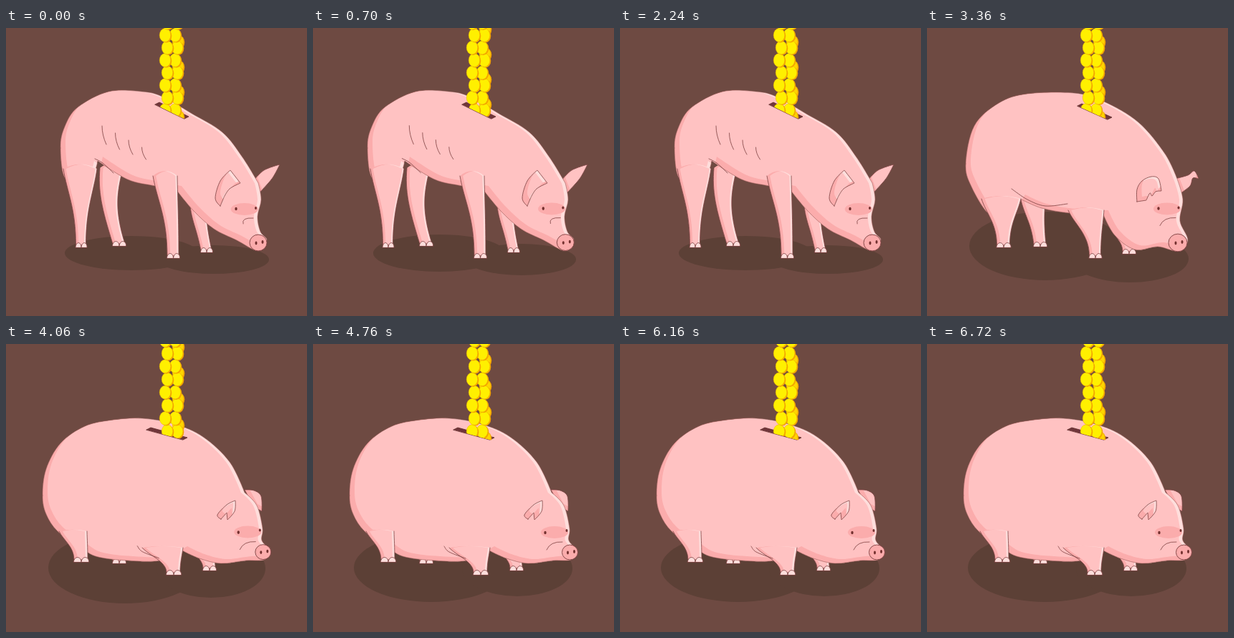
An HTML page for the animation above (6.86 s loop, 420 by 403 pixels).

```html
<!DOCTYPE html>
<html lang="en">
<head>
<meta charset="utf-8">
<title>Piggy bank</title>
<style>
html, body { margin: 0; width: 100%; height: 100%; overflow: hidden; background: #6e4a42; }
svg { display: block; width: 100vw; height: 100vh; }
</style>
</head>
<body>
<svg id="stage" viewBox="0 0 420 403"></svg>
<script>
const STEP = 140, COUNT = 49;
const PINK = '#ffc2c2', DARK = '#fbacac', PALE = '#ffdedc', INK = '#7b4040', EYE = '#73302f', SHADOW = '#5c4036';

// Points are "x,y"; a trailing "!" makes a sharp corner.
// Legs: left and right at the top, top y, foot x, floor y, half width, knee bend.
const poses = [
  {
    until: 17, fullness: 0,
    shadow: [[175, 315, 93, 24], [290, 324, 77, 20]],
    torso: '76,168 82,138 100,111 143,89 190,89 218,96 258,119 302,146 330,181 352,217! 356,240 351,264 355,285 364,297 352,312 322,297 290,281 262,256 238,227! 208,221 170,212 128,186! 118,208 84,212',
    far: [[131, 163, 196, 158, 305, 9, -16], [257, 280, 248, 280, 314, 8, -6]],
    near: [[80, 127, 197, 105, 307, 7.5, 0], [205, 239, 207, 233.5, 322, 8.5, 0]],
    earBack: '346,213! 360,199 382,191! 371,211 353,231!',
    ear: '299,249! 292,238 299,214 313,199! 327,217! 312,225 304,237!',
    fold: '124,183 135,189 150,203',
    eyes: [321, 253, 348.5, 252], nose: [352, 300.5, 12],
    slot: [208, 107, 249, 127], coins: [10, 17.5]
  },
  {
    until: 25, fullness: 1,
    shadow: [[165, 305, 106, 48], [283, 323, 82, 33]],
    torso: '54,190 66,137 100,105 140,92 205,91 247,103 295,132 332,176 349,211! 357,240 353,270 364,297 350,312 322,306 290,310 262,290 246,261! 200,259 160,252 130,239! 110,264 86,260 62,222',
    far: [[131, 165, 240, 158, 306, 9, -3], [258, 285, 283, 282, 316, 9, 0]],
    near: [[76, 131, 239, 107, 307, 9.5, 0], [197, 247, 255, 235, 322, 8.5, 0]],
    earBack: '346,211! 364,206 373,200 379,211! 371,210 367,221 354,231!',
    ear: '293,243! 293,226 300,214 313,208 323,211 327,228! 319,229 314,235 311,231 306,241!',
    fold: '118,225 140,240 165,249 196,246',
    eyes: [323, 252.5, 351, 251.5], nose: [350, 300.5, 13],
    slot: [210, 109, 252, 128], coins: [10, 17.5]
  },
  {
    until: COUNT, fullness: 1,
    shadow: [[165, 313, 108, 48], [285, 314, 77, 39]],
    torso: '51,212 56,175 76,139 110,115 150,106 190,104 235,112 275,130 312,165 333,208! 350,226 358,258 357,275 369,290 360,302 335,303 300,307 270,300 246,289! 215,303 170,303 125,297 100,281 72,262 56,238',
    far: [[148, 167, 294, 158, 307, 9, 0], [262, 290, 290, 284, 317, 9, 0]],
    near: [[74, 113, 262, 105, 305, 10, 0], [190, 247, 285, 234, 323, 10, 0]],
    earBack: '332,204! 345,205 355,213 356,234! 345,228!',
    ear: '300,245! 295,239 308,225 320,219! 319,234 309,246! 308,236!',
    fold: '183,283 190,291 213,300',
    eyes: [324, 264, 354, 261], nose: [358.5, 291.5, 11],
    slot: [196, 120, 247, 134], coins: [13, 18.2]
  }
];

// Smooth path through the points.
function curve(text, closed = true) {
  const p = text.split(' ').map(s => ({ sharp: s.endsWith('!'), v: s.replace('!', '').split(',').map(Number) }));
  const n = p.length;
  const at = i => p[closed ? (i + n) % n : Math.max(0, Math.min(n - 1, i))];
  const slope = (i, k) => at(i).sharp ? 0 : (at(i + 1).v[k] - at(i - 1).v[k]) / 6;
  let d = 'M' + p[0].v;
  for (let i = 0; i < n - (closed ? 0 : 1); i++) {
    const a = at(i).v, b = at(i + 1).v;
    d += `C${a.map((v, k) => v + slope(i, k))} ${b.map((v, k) => v - slope(i + 1, k))} ${b}`;
  }
  return d + (closed ? 'Z' : '');
}

const path = (d, fill, ink = 'none', w = 0.8) =>
  `<path d="${d}" fill="${fill}" stroke="${ink}" stroke-width="${w}" stroke-linecap="round"/>`;
const oval = (x, y, rx, ry, fill, extra = '') =>
  `<ellipse cx="${x}" cy="${y}" rx="${rx}" ry="${ry}" fill="${fill}" ${extra}/>`;

// A pink shape, dark on its lower left and pale on its right.
let clips = 0;
function solid(d, dark, pale) {
  const id = 'clip' + clips++;
  const rim = ([x, y], fill) =>
    `<path d="${d}M-99-99H600V600H-99Z" fill="${fill}" fill-rule="evenodd" transform="translate(${x} ${y})"/>`;
  return `<clipPath id="${id}"><path d="${d}"/></clipPath>
    <g clip-path="url(#${id})">${path(d, PINK)}${rim(pale, PALE)}${rim(dark, DARK)}</g>`;
}

function hoof(x, floor, w) {
  return [-w, 0].map(dx => path(
    `M${x + dx} ${floor}q${w * .1} -6.5 ${w * .55} -6.5q${w * .45} 1 ${w * .45} 6.5Z`, PALE, INK)).join('');
}

function leg([x1, x2, y, foot, floor, w, bend]) {
  const h = floor - y, end = floor - 3;
  const knee = (top, ankle) => [
    `${top + (ankle - top) * .3 + bend / 2} ${y + h * .3}`, `${ankle + bend} ${y + h * .5}`];
  const [a, b] = knee(x1, foot - w), [c, d] = knee(x2, foot + w - 1);
  const sides = `M${x1} ${y}C${a} ${b} ${foot - w} ${end}H${foot + w - 1}C${d} ${c} ${x2} ${y}`;
  const top = `Q${(x1 + x2) / 2} ${y - h * .12} ${x1} ${y}Z`;
  return solid(sides + top, [w * .5, 0], [-w * .3, 0]) + path(sides, 'none', INK) + hoof(foot, floor, w * 1.08);
}

function face({ eyes: [x1, y1, x2, y2], nose: [nx, ny, r], fullness }) {
  return oval((x1 + x2) / 2 - 2, (y1 + y2) / 2 + 1, 19, 8.5, DARK)
    + oval(x1, y1, 1.7, 2.3, EYE) + oval(x2, y2, 1.5, 2, EYE)
    + path(`M${x1 + 10 - 8 * fullness} ${y1 + 21 + 3 * fullness}Q${x1 + 7} ${y1 + 12} ${x1 + 24} ${y1 + 13}`, 'none', INK)
    + oval(nx, ny, r, r * .95, DARK, `stroke="${INK}" stroke-width=".9"`)
    + [-3, 6].map(dx => oval(nx + dx, ny - dx / 6, 1.5, 2.4, EYE)).join('');
}

function ribs() {
  let out = '';
  for (let i = 0; i < 4; i++) {
    const len = 26 - 3 * i;
    out += path(`M${134 + 18.5 * i} ${137 + 10 * i}q0 ${len / 2} 6 ${len}`, 'none', INK);
  }
  return out;
}

function coin(x, y, fill) {
  return oval(x + 1.5, y + 1, 7.8, 9.5, '#f5a300')
    + oval(x, y, 7.8, 9.4, fill, 'stroke="#eab000" stroke-width=".5"');
}

function coinStack([top, gap], odd) {
  let back = '', front = '';
  for (let k = 8; k >= -2; k--) {
    const y = top + k * gap, side = (k + odd) & 1;
    if (!side) back += coin(240, y + 9, '#ffd500');
    for (const x of [236, 222]) front += coin(x + 3 * side, y, '#fff000');
  }
  return back + front;
}

function slot([x1, y1, x2, y2], stack) {
  const id = 'clip' + clips++;
  const end = y2 + (280 - x2) * (y2 - y1) / (x2 - x1);
  return path(`M${x1} ${y1}l6 -3L${x2 + 6} ${y2 - 3}l-6 3Z`, '#70363a', '#5e2928')
    + `<clipPath id="${id}"><path d="M${x1} -9V${y1}L280 ${end}V-9Z"/></clipPath>
    <g clip-path="url(#${id})">${stack}</g>`;
}

function pig(p, odd) {
  const torso = curve(p.torso), ear = curve(p.ear);
  return `<g visibility="hidden">
    ${p.shadow.map(([x, y, rx, ry]) => oval(x + odd, y, rx - odd, ry + 2 * odd, SHADOW)).join('')}
    ${p.far.map(leg).join('')}
    <g transform="translate(${odd} 0)">
      ${solid(curve(p.earBack), [5, -4], [0, 0])}${path(curve(p.earBack), 'none', INK)}
    </g>
    ${solid(torso, [7, -6], [-5, 0])}${path(torso, 'none', '#9a5c58', .6)}
    ${p.near.map(leg).join('')}
    ${solid(ear, [7, -7], [-3, 3])}${path(ear, 'none', INK)}
    <g transform="translate(${.3 * odd} ${-.4 * odd})">
      ${path(curve(p.fold, false), 'none', INK)}${p.fullness ? '' : ribs()}${face(p)}
    </g>
    ${slot(p.slot, coinStack(p.coins, odd))}
  </g>`;
}

const stage = document.getElementById('stage');
stage.innerHTML = poses.flatMap(p => [pig(p, 0), pig(p, 1)]).join('');
const views = [...stage.children];
const start = performance.now();
let shown = null;

function draw() {
  const n = Math.floor((performance.now() - start) / STEP) % COUNT;
  const next = views[poses.findIndex(p => n < p.until) * 2 + n % 2];
  if (next !== shown) {
    if (shown) shown.setAttribute('visibility', 'hidden');
    next.setAttribute('visibility', 'visible');
    shown = next;
  }
  requestAnimationFrame(draw);
}
draw();
</script>
</body>
</html>
```
